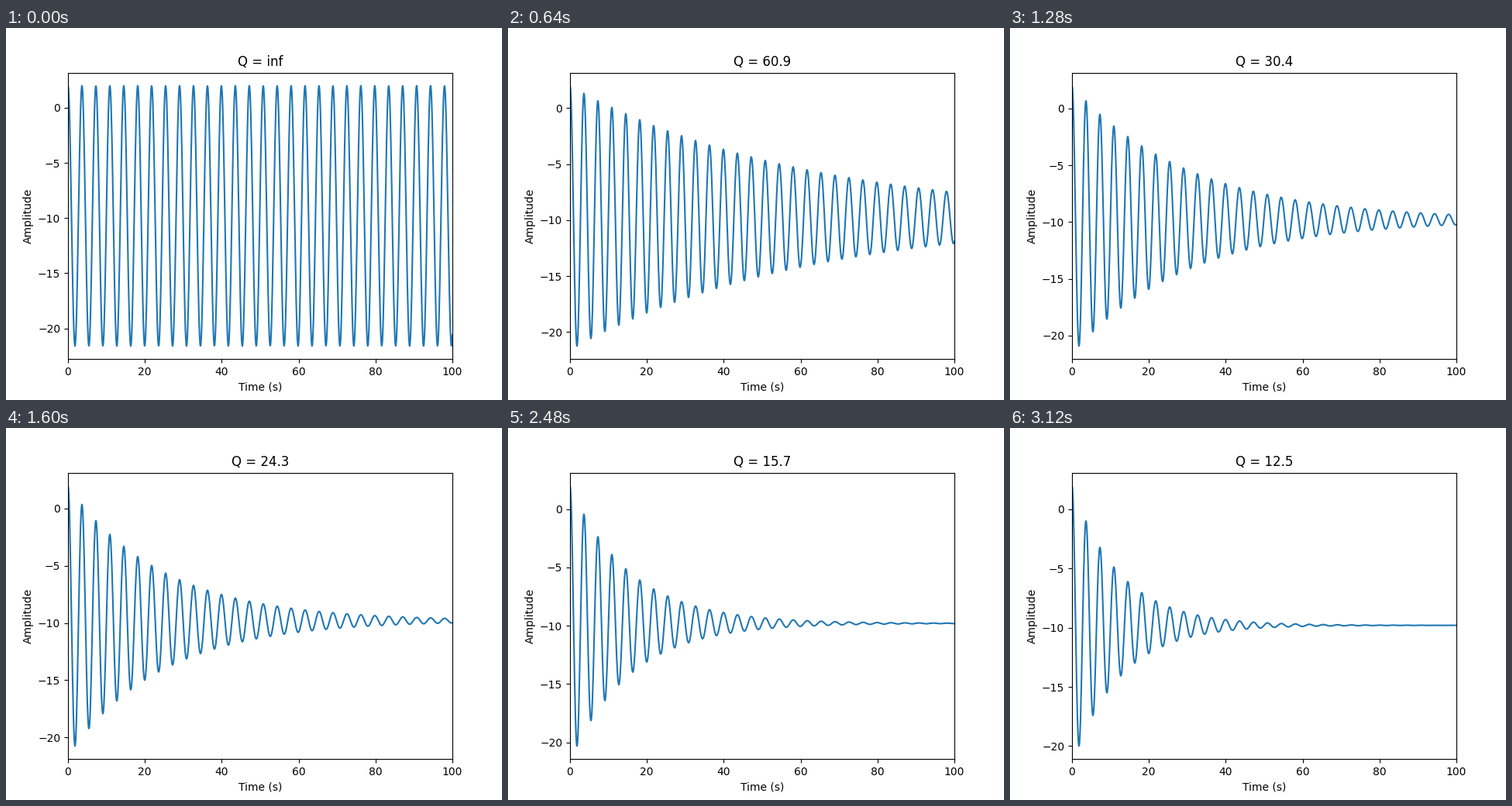
Write a matplotlib script that moves like this. It is 640x480 px and loops after 3200 ms.

```python
import numpy as np
import matplotlib.pyplot as plt
from matplotlib.animation import FuncAnimation

FRAMES = 40
INTERVAL = 80          # ms
MAX_DECAY = 0.08       # decay rate reached on the last frame
OMEGA0 = np.sqrt(3)    # natural angular frequency
REST = -9.8            # equilibrium position
START = 2.0            # released from rest here

t = np.linspace(0, 100, 1000)


def displacement(decay):
    """Underdamped oscillator released from rest."""
    omega = np.sqrt(OMEGA0**2 - decay**2)
    swing = np.cos(omega * t) + decay / omega * np.sin(omega * t)
    return REST + (START - REST) * np.exp(-decay * t) * swing


def quality(i):
    return (FRAMES - 1) / (MAX_DECAY * i) if i else float("inf")


fig, ax = plt.subplots(figsize=(6.4, 4.8), dpi=100)
line, = ax.plot(t, displacement(0))
ax.set_xlim(0, 100)
ax.set_xlabel("Time (s)")
ax.set_ylabel("Amplitude")
title = ax.set_title("Q = inf")


def update(i):
    line.set_ydata(displacement(MAX_DECAY * i / (FRAMES - 1)))
    ax.relim()
    ax.autoscale_view(scalex=False)
    title.set_text("Q = " + str(quality(i))[:4])
    return line, title


anim = FuncAnimation(fig, update, frames=FRAMES, interval=INTERVAL,
                     repeat=True, repeat_delay=0, blit=False)
plt.show()
```
